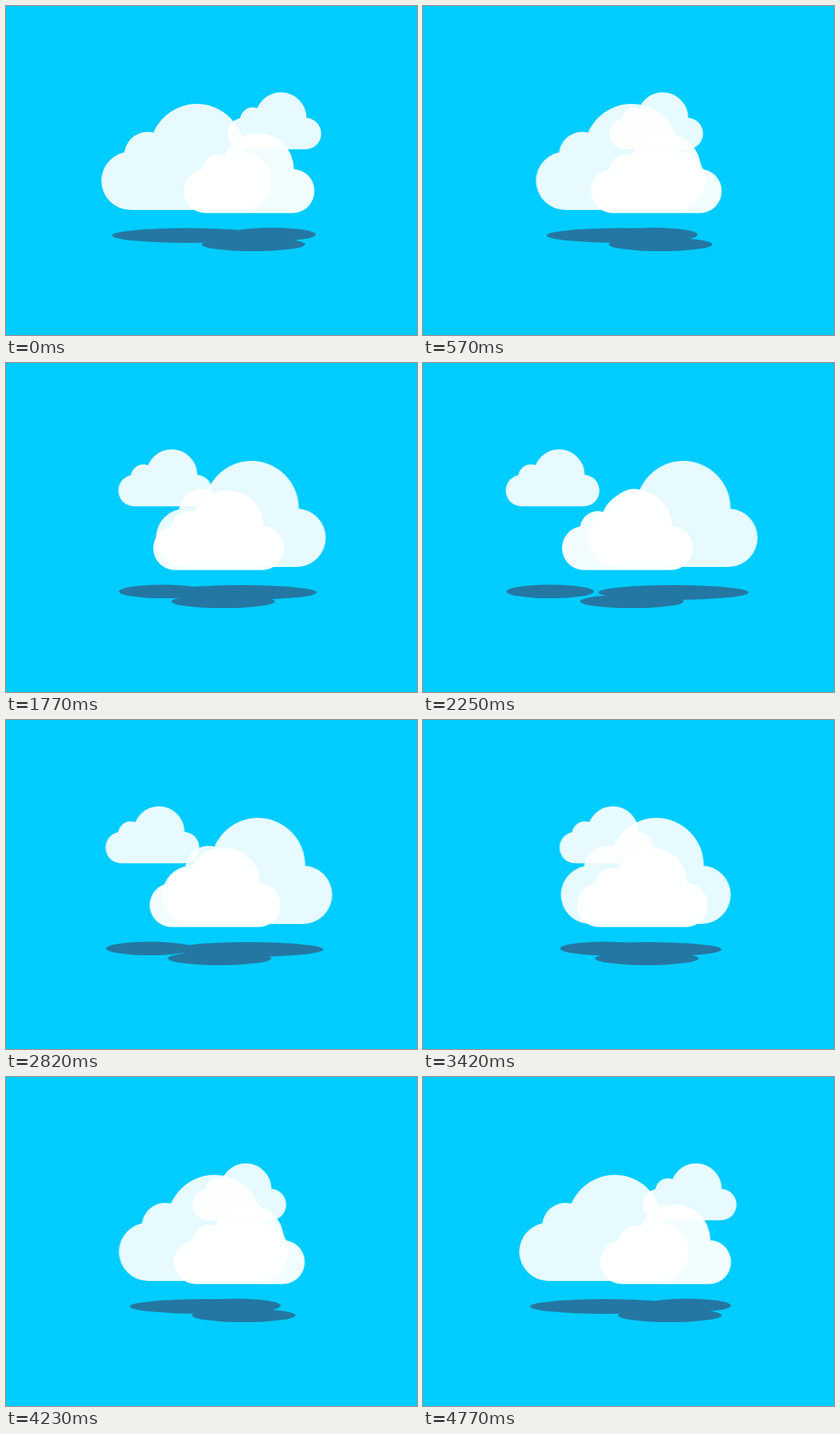
Animation, 500 px wide and 400 px high, one loop 4.8 s. Source, as an HTML page without scripts:

```html
<!DOCTYPE html>
<html lang="en">
<head>
<meta charset="utf-8">
<title>Drifting clouds</title>
<style>
  html, body { margin: 0; width: 100%; height: 100%; overflow: hidden; background: #0cf; }
  svg { display: block; width: 500px; height: 400px; }
  .drift { animation: drift 2.4s linear infinite alternate; }
  .back { --dx: 90px; }
  .front { --dx: -50px; }
  .small { --dx: -180px; }
  .shadows { fill: #2477a2; }
  .cloud { fill: #fff; opacity: .9; }
  .front.cloud { opacity: .95; }
  @keyframes drift {
    from { transform: translateX(0); }
    to { transform: translateX(var(--dx)); }
  }
</style>
</head>
<body>
<svg viewBox="0 0 500 400">
  <g class="shadows">
    <ellipse class="drift back" cx="220.3" cy="279" rx="91.2" ry="9"/>
    <ellipse class="drift front" cx="301" cy="289.8" rx="63" ry="8.2"/>
    <ellipse class="drift small" cx="323.5" cy="277.8" rx="53.3" ry="8.2"/>
  </g>
  <g class="cloud drift small">
    <rect x="269.5" y="136" width="114" height="38.3" rx="19.15"/>
    <circle cx="334.4" cy="136.2" r="31.2"/>
    <circle cx="300" cy="138.4" r="15.2"/>
  </g>
  <g class="cloud drift back">
    <rect x="116" y="177" width="206.6" height="71" rx="35.5"/>
    <circle cx="232.2" cy="176.6" r="57.5"/>
    <circle cx="172" cy="181" r="28"/>
  </g>
  <g class="cloud drift front">
    <rect x="216" y="198.2" width="159.3" height="53.6" rx="26.8"/>
    <circle cx="306.2" cy="198.7" r="44"/>
    <circle cx="259.4" cy="201.6" r="21.5"/>
  </g>
</svg>
</body>
</html>
```
